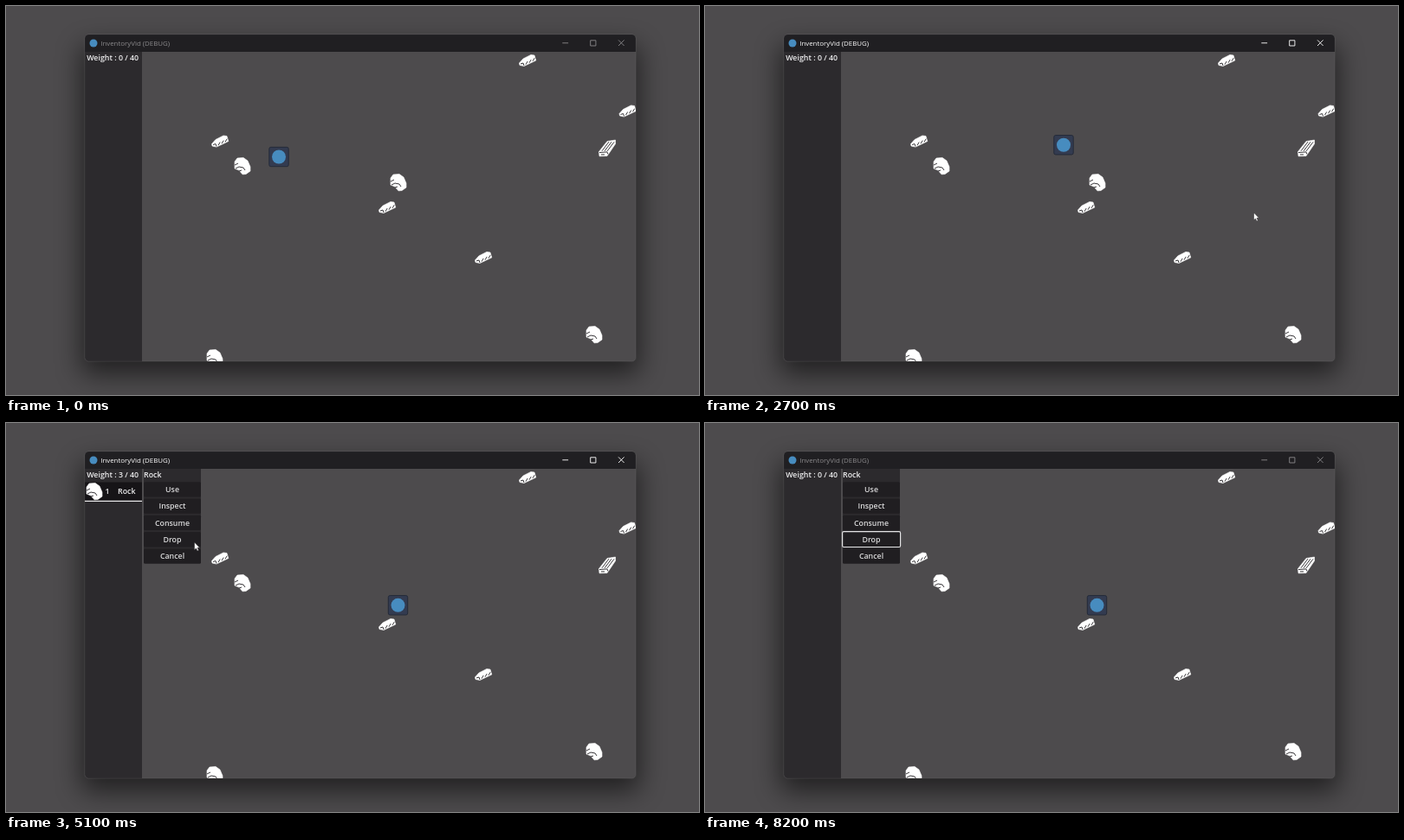
An HTML page for the animation above (8.3 s loop, 800 by 450 pixels).

```html
<!DOCTYPE html>
<html lang="en">
<head>
<meta charset="utf-8">
<title>Inventory demo</title>
<style>
  html, body { margin: 0; width: 100%; height: 100%; overflow: hidden; background: #4d4b4d; }
  svg { display: block; width: 800px; height: 450px; }
  text { font: 600 8.83px "Open Sans", "Noto Sans", sans-serif; fill: #efeff0; }
  .title { font-weight: 400; font-size: 7.9px; fill: currentColor; }
  .menu text { text-anchor: middle; fill: #d9d9da; }
  .menu .head { text-anchor: start; fill: #efeff0; }
  .shadow { filter: blur(15px); }
  .body { fill: #fff; stroke: #fff; stroke-width: .6; stroke-linejoin: round; }
  .crack { fill: none; stroke: #3a383b; }
</style>
</head>
<body>
<svg viewBox="0 0 800 450">
  <defs>
    <clipPath id="frame"><rect x="91" y="33" width="636" height="378" rx="4.5"/></clipPath>
    <g id="rock">
      <path class="body" d="M-9-5L-6-9L1-9.6L6-6L9 1L9 6L4 9.5L0 9.8L-4 5L-9 3Z"/>
      <path class="crack" d="M-9-1L-5-3M-8 3L-4 1L1 2L3 5M-4 6L-1 5"/>
    </g>
    <g id="ingot">
      <path class="body" d="M-9.5 3L-5-2L4-6.6L8-6L9.8 0L-4 6.6L-9 5.5Z"/>
      <path class="crack" d="M-8 4L-5 3L-4 6"/>
    </g>
    <g id="wood">
      <path class="body" d="M-9.5 4L0-8L9.5-9.5L9.5-5L0 9L-9 9.3Z"/>
      <path class="crack" d="M-9 5L0 4.4L1 7M-7 7.4H-3"/>
    </g>
  </defs>

  <rect width="800" height="450" fill="#4d4b4d"/>
  <rect class="shadow" x="87" y="46" width="644" height="380" rx="8" fill="#000" opacity=".56"/>
  <g clip-path="url(#frame)">
    <rect x="91" y="33" width="636" height="378" fill="#4d4b4d"/>
    <g id="items"></g>
    <g id="player">
      <rect x="-11.2" y="-11.2" width="22.4" height="22.4" rx="2" fill="#333b50" stroke="#242a38"/>
      <circle r="8" fill="#478cbf"/>
    </g>
    <rect x="91" y="53" width="66" height="358" fill="#2c2a2d"/>
    <text id="weight" x="93.2" y="63"></text>
    <g id="row">
      <rect id="rowBox" x="91" y="68.5" width="66" height="21.5"/>
      <use href="#rock" x="102" y="79"/>
      <text x="114.6" y="82.2">1</text>
      <text x="129" y="82.2">Rock</text>
      <path id="rowLine" d="M91 90.3H157" stroke="#e9e9ea" stroke-width="1.2"/>
    </g>
    <g id="menu" class="menu">
      <rect x="159" y="53" width="66" height="109" fill="#2c2a2d"/>
      <text class="head" x="159" y="63">Rock</text>
      <g id="buttons"></g>
      <rect id="dropFocus" x="158.6" y="125.7" width="67" height="17.8" rx="1.5" fill="none" stroke="#e4e4e5" stroke-width="1.2"/>
    </g>
    <rect x="91" y="33" width="636" height="20" fill="#201f22"/>
    <circle cx="101" cy="43" r="4.5" fill="#478cbf"/>
    <g id="bar">
      <text class="title" x="109.2" y="45.8">InventoryVid (DEBUG)</text>
      <path fill="none" stroke="currentColor" stroke-width=".9" d="M642.3 42.8h6.8M674.7 39.8h6.2v6.2h-6.2ZM707 39.4l6.6 6.6M713.6 39.4l-6.6 6.6"/>
    </g>
  </g>
  <rect x="90.8" y="32.8" width="636.4" height="378.4" rx="4.8" fill="none" stroke="#fff" stroke-opacity=".1" stroke-width=".8"/>
  <path id="cursor" d="M0 0V8.7L2 6.9L3.4 10L4.9 9.3L3.5 6.3H6.1Z" fill="#fff" stroke="#242225" stroke-width=".5"/>
</svg>
<script>
const LOOP = 8300, STEP = 100, SPEED = 0.11;
const $ = id => document.getElementById(id);
const clamp = (v, max) => Math.min(Math.max(v, 0), max);

// Parallel strokes: start, gap between strokes, stroke direction.
function hatch(id, count, [x, y], [gx, gy], [dx, dy]) {
  let d = '';
  for (let i = 0; i < count; i++) d += `M${x + i * gx} ${y + i * gy}l${dx} ${dy}`;
  $(id).insertAdjacentHTML('beforeend', `<path class="crack" d="${d}"/>`);
}
hatch('ingot', 3, [-2, 4.6], [4, -1.9], [2.2, -3.6]);
hatch('wood', 3, [-6, 3.2], [3, 0.1], [8, -10.6]);

const spots = {
  rock: [[273, 185], [453, 204], [679, 380], [241, 407]],
  ingot: [[247, 156.5], [602, 63], [717.5, 121.5], [440, 233], [551, 291]],
  wood: [[694, 164.5]]
};
$('items').innerHTML = Object.entries(spots).map(([kind, list]) =>
  list.map(([x, y]) => `<use href="#${kind}" x="${x}" y="${y}"/>`).join('')).join('');
const pickup = $('items').children[1];

$('buttons').innerHTML = ['Use', 'Inspect', 'Consume', 'Drop', 'Cancel'].map((label, i) => {
  const y = 68.2 + i * 19.3;
  return `<rect x="159" y="${y}" width="66" height="17.3" rx="1.5" fill="#201e21"/>
    <text x="192" y="${y + 11.9}">${label}</text>`;
}).join('');

// Direction keys and how long each is held; the player walks at constant speed.
const held = [
  { dx: 1, from: 1500, ms: 900 }, { dy: -1, from: 1800, ms: 280 }, { dy: 1, from: 2240, ms: 155 },
  { dx: 1, from: 2700, ms: 350 }, { dy: 1, from: 2700, ms: 455 }
];
function playerAt(t) {
  let x = 315, y = 174.5;
  for (const { dx = 0, dy = 0, from, ms } of held) {
    const way = SPEED * clamp(t - from, ms);
    x += dx * way;
    y += dy * way;
  }
  return [x, y];
}

// The pointer rests between eased glides.
const glides = [
  { from: 100, ms: 300, to: [728, 225] },
  { from: 500, ms: 600, to: [706, 264] },
  { from: 1300, ms: 100, to: [633.5, 239] },
  { from: 3000, ms: 700, to: [115.5, 90] },
  { from: 4700, ms: 400, to: [217.5, 138] },
  { from: 5900, ms: 200, to: [352, 108.5] },
  { from: 6100, ms: 200, to: [383.5, 139] },
  { from: 6700, ms: 600, to: [652, 170] }
];
function cursorAt(t) {
  let x = 773, y = 241;
  for (const { from, ms, to } of glides) {
    const p = clamp((t - from) / ms, 1), k = p * p * (3 - 2 * p);
    x += (to[0] - x) * k;
    y += (to[1] - y) * k;
  }
  return [x, y];
}

const show = (el, on) => el.setAttribute('visibility', on ? 'visible' : 'hidden');
const place = (el, [x, y]) => el.setAttribute('transform', `translate(${x} ${y})`);

function draw(t) {
  const within = (from, to = LOOP) => t >= from && t < to;
  const carrying = within(3100, 5400), selected = within(4200, 5400);
  place($('player'), playerAt(t));
  place($('cursor'), cursorAt(t));
  show($('cursor'), within(100, 7400));
  show(pickup, !within(3100));
  show($('row'), carrying);
  show($('rowLine'), selected);
  show($('menu'), within(4200));
  show($('dropFocus'), within(5400));
  $('rowBox').setAttribute('fill', selected ? '#161417' : '#1d1b1e');
  $('weight').textContent = `Weight : ${carrying ? 3 : 0} / 40`;
  $('bar').style.color = within(200, 8100) ? '#fff' : '#8b8a8c';
}

const start = performance.now();
function tick() {
  const t = (performance.now() - start) % LOOP;
  draw(Math.floor(t / STEP) * STEP);
  requestAnimationFrame(tick);
}
draw(0);
requestAnimationFrame(tick);
</script>
</body>
</html>
```
